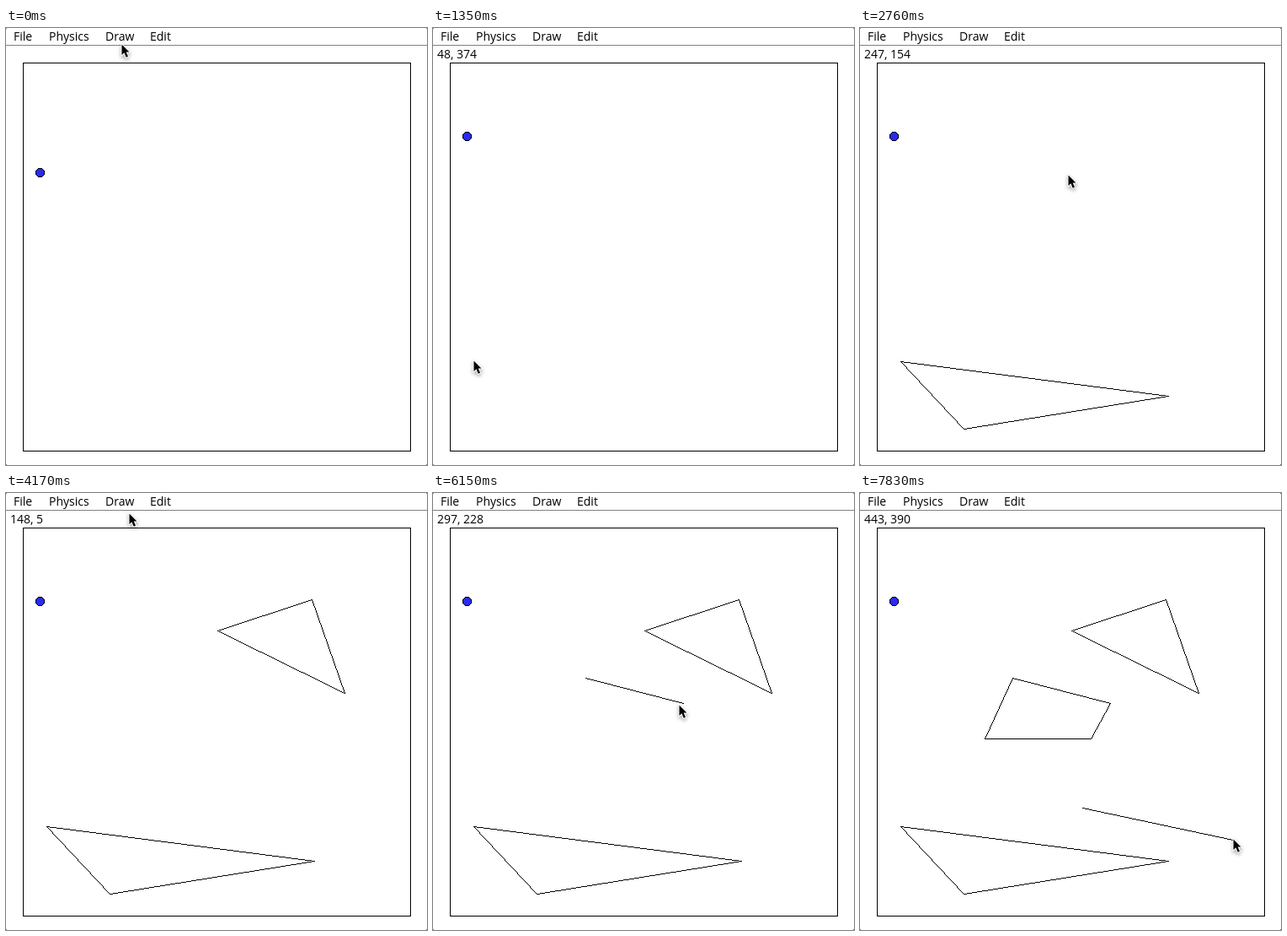
An HTML page with a canvas for the animation above (8000 ms loop, 500 px wide and 518 px high).

```html
<!DOCTYPE html>
<html lang="en">
<head>
<meta charset="utf-8">
<title>Drawing shapes</title>
<style>
  html, body { margin: 0; width: 100%; height: 100%; overflow: hidden; background: #fff; }
  canvas { display: block; }
</style>
</head>
<body>
<canvas id="stage" width="500" height="518"></canvas>
<script>
const ctx = document.getElementById('stage').getContext('2d');
const LOOP = 8000, STEP = 30, LAST = 7830;
const BAR = 21, ROW = 19, ROW_TOP = 24, MENU_X = 108;
const PRESS = 90; // rest between arriving and clicking
const FONT = '"Open Sans", "Noto Sans", sans-serif';
const BLUE = '#3a75de';
const titles = [['File', 9], ['Physics', 51], ['Draw', 118], ['Edit', 171]];
const items = [['Draw Triangle...', 3], ['Draw Quadrilateral...', 4]];

// What the user does, in order; each call moves the pointer on
const stops = [], menus = [], shapes = [];
let sides;

function hover(at, x, y, wait = 0) {
  stops.push({ at, x, y, leave: at + wait });
  return at + wait;
}

function open(at, x, y) {
  menus.push({ from: hover(at, x, y, PRESS) });
}

function pick(at, x, y) {
  menus.at(-1).to = hover(at, x, y, PRESS);
  sides = items[rowAt(y)][1];
}

function corner(at, x, y) {
  const last = shapes.at(-1);
  if (!last || last.points.length === last.sides) shapes.push({ sides, points: [] });
  shapes.at(-1).points.push({ at: hover(at, x, y, PRESS), x, y });
}

hover(0, 137, 20);
open(300, 134, 10);
pick(870, 147, 36);
corner(1320, 48, 395);
corner(1830, 366, 436);
corner(2310, 123, 475);
hover(2700, 247, 175, 60);
corner(2820, 251, 163);
corner(3030, 363, 126);
corner(3300, 402, 237);
hover(4140, 148, 26);
hover(4200, 143, 23);
open(4350, 138, 10);
pick(4890, 153, 51);
corner(5610, 181, 219);
corner(6030, 297, 249);
hover(6150, 292, 252);
corner(6480, 274, 291);
corner(6870, 148, 291);
corner(7380, 264, 373);
corner(7740, 443, 411);

function rowAt(y) {
  return Math.floor((y - ROW_TOP) / ROW);
}

function pointer(t) {
  const i = stops.findLastIndex(s => s.at <= t);
  const a = stops[i], b = stops[i + 1] || a;
  if (a === b || t <= a.leave) return a;
  const u = (t - a.leave) / (b.at - a.leave), ease = u * u * (3 - 2 * u);
  return {
    x: Math.round(a.x + (b.x - a.x) * ease),
    y: Math.round(a.y + (b.y - a.y) * ease)
  };
}

const menuOpen = t => menus.some(m => t >= m.from && t < m.to);

// Last pointer position reported over the drawing area
function reported(t) {
  for (let s = t - STEP; s >= 0; s -= STEP) {
    const p = pointer(s);
    if (p.y >= BAR && !menuOpen(s)) return p;
  }
  return null;
}

function rect(x, y, w, h, color) {
  ctx.fillStyle = color;
  ctx.fillRect(x, y, w, h);
}

function text(str, x, y, color = '#000', size = 14, weight = 500) {
  ctx.font = `${weight} ${size}px ${FONT}`;
  ctx.fillStyle = color;
  ctx.fillText(str, x, y);
}

// Hard-edged one-pixel line; ties round towards its start
function line(a, b) {
  const dx = b.x - a.x, dy = b.y - a.y, n = Math.max(Math.abs(dx), Math.abs(dy));
  const part = (d, i) => Math.sign(d) * Math.ceil(Math.abs(d) * i / n - 0.5);
  for (let i = 0; i <= n; i++) rect(a.x + part(dx, i), a.y + part(dy, i), 1, 1, '#000');
}

function drawShape({ sides, points }, t) {
  const done = points.filter(p => p.at <= t);
  for (let i = 1; i < done.length; i++) line(done[i - 1], done[i]);
  if (done.length === sides) line(done[0], done[sides - 1]);
}

function drawBall(t) {
  const u = Math.min(t / 930, 1), y = Math.round(171 - 43 * u * (1.15 - 0.15 * u));
  for (let dy = -5; dy <= 5; dy++) {
    for (let dx = -5; dx <= 5; dx++) {
      const d = Math.hypot(dx, dy);
      if (d < 5.5) rect(40 + dx, y + dy, 1, 1, d < 4.5 ? '#2a2af0' : '#000');
    }
  }
}

function drawWindow(isOpen) {
  rect(0, 0, 500, 518, '#fff');
  rect(0, 20, 500, 1, '#808080');
  for (const x of [0, 499]) for (const y of [0, 517]) rect(x, y, 1, 1, '#777');
  ctx.strokeStyle = '#000';
  ctx.lineWidth = 1;
  ctx.strokeRect(20.5, 41.5, 460, 460);
  if (isOpen) rect(MENU_X, 0, 54, 20, BLUE);
  for (const [name, x] of titles) {
    text(name, x, 15, isOpen && name === 'Draw' ? '#fff' : '#000');
  }
}

function drawMenu(p) {
  ctx.save();
  ctx.beginPath();
  ctx.rect(95, BAR, 220, 70);
  ctx.clip();
  ctx.shadowColor = 'rgba(0,0,0,.45)';
  ctx.shadowBlur = 8;
  ctx.shadowOffsetY = 3;
  ctx.beginPath();
  ctx.roundRect(MENU_X, BAR, 189, 46, [0, 0, 4, 4]);
  ctx.fillStyle = '#fff';
  ctx.fill();
  ctx.restore();
  items.forEach(([name], i) => {
    const top = ROW_TOP + ROW * i, on = rowAt(p.y) === i;
    if (on) rect(MENU_X, top, 189, ROW, BLUE);
    text(name, 130, top + 16, on ? '#fff' : '#000', 14.5);
  });
}

function drawPointer({ x, y }) {
  ctx.save();
  ctx.translate(x + 0.5, y - 0.5);
  const arrow = new Path2D('M0 0V12.4L2.9 9.8L5.2 15.2L7.5 14.3L5.2 9H9Z');
  ctx.lineWidth = 2;
  ctx.strokeStyle = '#fff';
  ctx.shadowColor = 'rgba(0,0,0,.4)';
  ctx.shadowBlur = 4;
  ctx.shadowOffsetY = 2;
  ctx.stroke(arrow);
  ctx.shadowColor = 'transparent';
  ctx.fillStyle = '#000';
  ctx.fill(arrow);
  ctx.restore();
}

function draw(t) {
  const isOpen = menuOpen(t), p = pointer(t), seen = reported(t);
  drawWindow(isOpen);
  if (seen) text(`${seen.x}, ${seen.y - BAR}`, 5, 36, '#000', 14, 400);
  drawBall(t);
  for (const s of shapes) drawShape(s, t);
  if (isOpen) drawMenu(p);
  drawPointer(p);
}

const start = performance.now();
function tick() {
  const t = (performance.now() - start) % LOOP;
  draw(Math.min(Math.floor(t / STEP) * STEP, LAST));
  requestAnimationFrame(tick);
}
tick();
</script>
</body>
</html>
```
